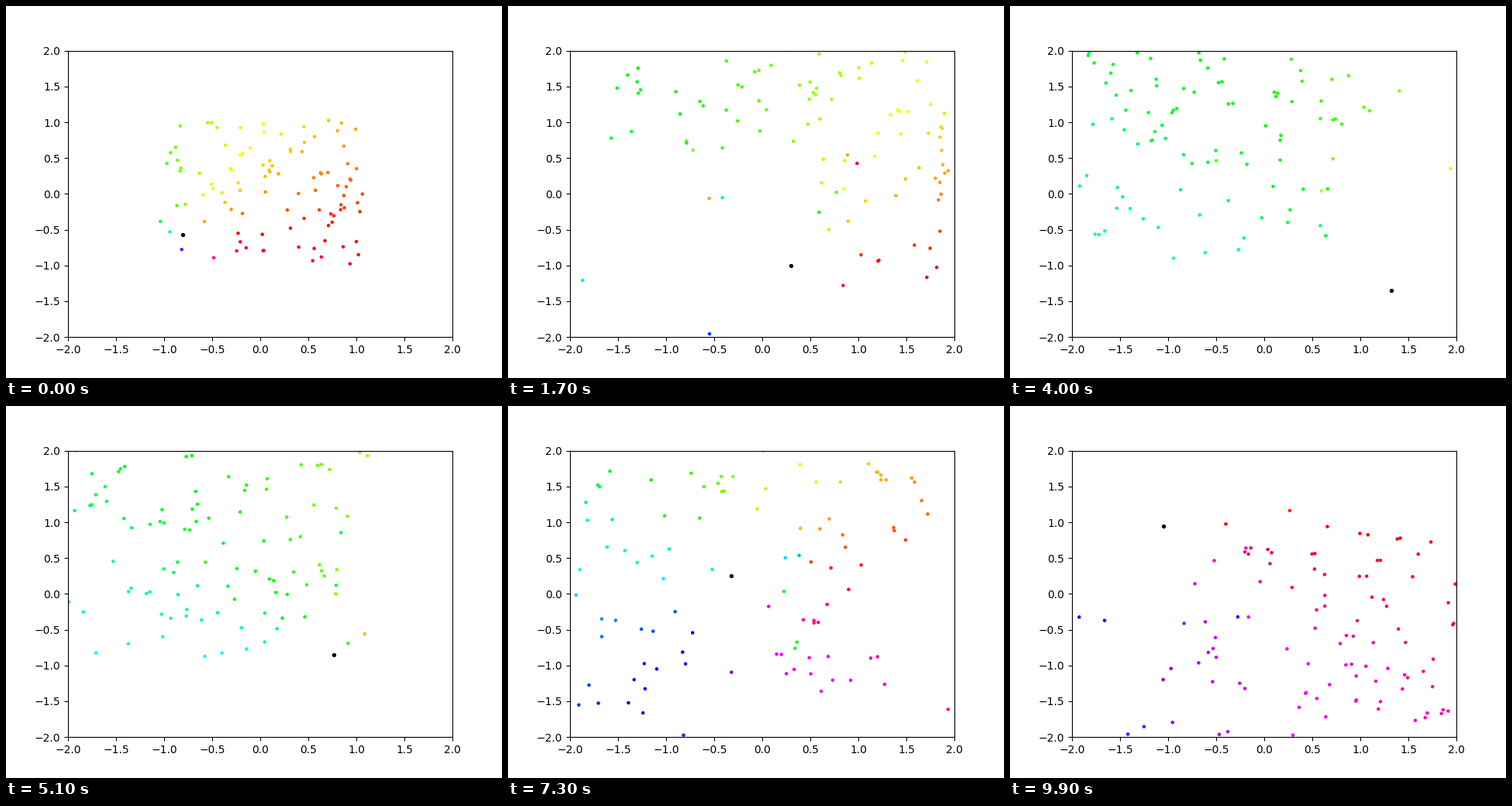
These frames come from a looping animation (640 by 480 pixels, 10000 ms). A matplotlib script:

```python
import numpy as np
import matplotlib.pyplot as plt
from matplotlib.animation import FuncAnimation
from matplotlib.colors import hsv_to_rgb

FRAMES = 100
HERD = 100
SPEED = 0.07
LIMIT = 2.0
QUARRY = (-0.31, -0.77)

rng = np.random.default_rng(4)

# The hunter runs straight and turns whenever its quarry escapes.
turn_steps = [0, 17, 36, 51, 73, 87, 92, 99]
turn_x = [-.806, .298, 1.524, .766, -.323, -.855, -1.0, -1.048]
turn_y = [-.569, -1.0, -1.525, -.851, .253, 1.097, 1.41, .946]
steps = np.arange(FRAMES)
hunter = np.column_stack([np.interp(steps, turn_steps, c) for c in (turn_x, turn_y)])


def heading_colours(angle):
    hue = angle / (2 * np.pi) % 1
    full = np.ones_like(hue)
    return hsv_to_rgb(np.column_stack([hue, full, full]))


def simulate():
    """Flee from the hunter; whoever has left the field reappears near the middle."""
    points = rng.uniform(-1, 1, (HERD, 2))
    points[0] = QUARRY
    states = []
    for danger in hunter:
        gone = (np.abs(points) > LIMIT).any(axis=1)
        dx, dy = (points - danger).T
        angle = np.arctan2(dy, dx)
        points = points + SPEED * np.column_stack([np.cos(angle), np.sin(angle)])
        points[gone] = rng.uniform(-1, 1, (gone.sum(), 2))
        states.append((points, heading_colours(angle)))
    return states


states = simulate()

fig, ax = plt.subplots(figsize=(6.4, 4.8), dpi=100)
ax.set_xlim(-LIMIT, LIMIT)
ax.set_ylim(-LIMIT, LIMIT)
prey_dots = ax.scatter(*states[0][0].T, s=5)
hunter_dot = ax.scatter(*hunter[0], s=8, color="black")


def draw(i):
    points, rgb = states[i]
    prey_dots.set_offsets(points)
    prey_dots.set_color(rgb)
    hunter_dot.set_offsets(hunter[i:i + 1])
    return prey_dots, hunter_dot


anim = FuncAnimation(fig, draw, frames=FRAMES, interval=100, repeat=True)
plt.show()
```
